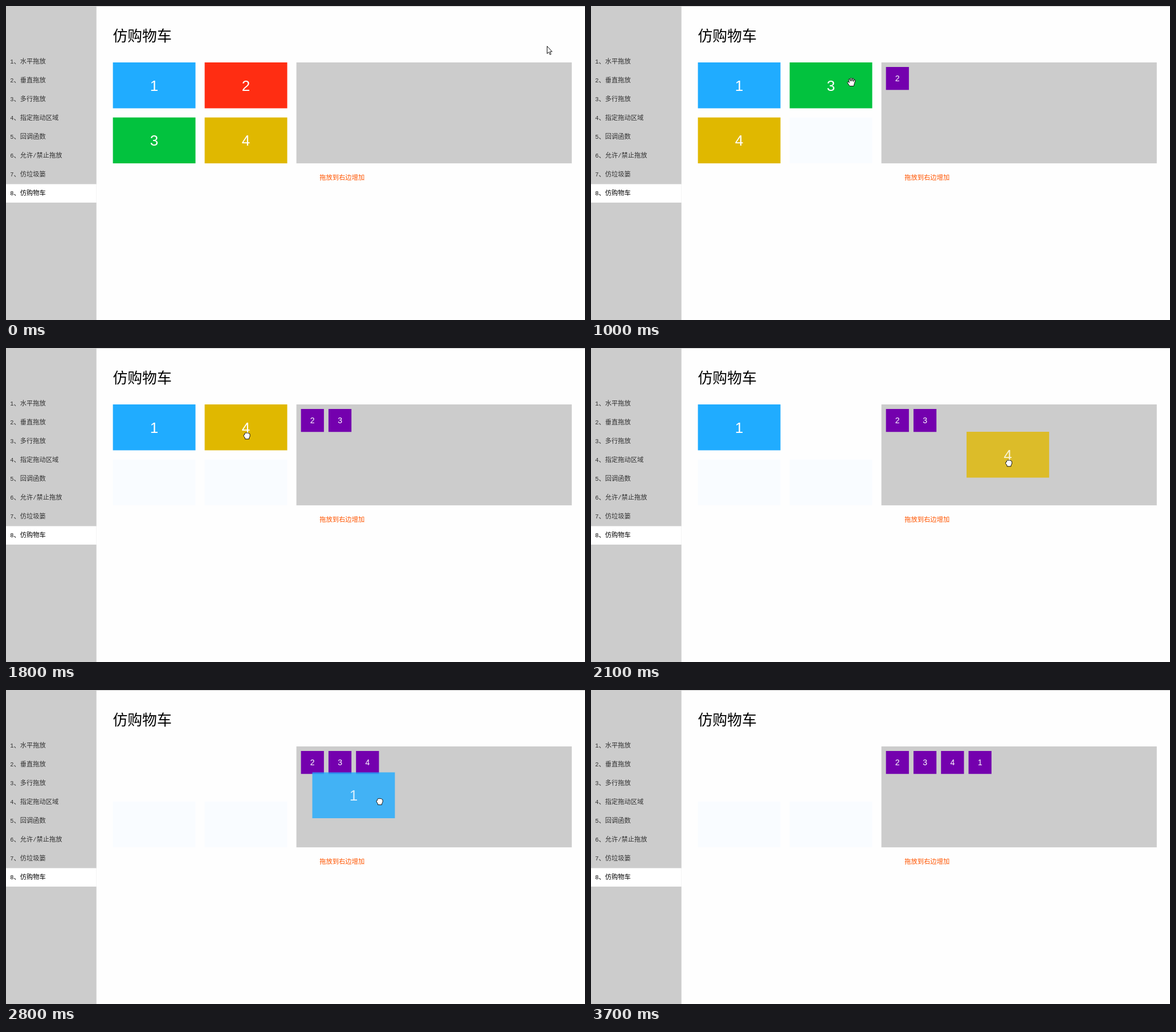
Animation of 1016 by 551 pixels, one loop 4.1 s. Source, as an HTML page with a canvas:

```html
<!DOCTYPE html>
<html lang="zh-CN">
<head>
<meta charset="utf-8">
<title>仿购物车</title>
<style>
  html, body { margin: 0; width: 100%; height: 100%; overflow: hidden; background: #fefefe; }
  canvas { display: block; }
</style>
</head>
<body>
<canvas id="stage" width="1016" height="551"></canvas>
<script>
const ctx = document.getElementById('stage').getContext('2d');
const LOOP = 4100, STEP = 100;
const CJK = '"Noto Sans CJK SC", "Noto Sans CJK", sans-serif';
const ARIAL = '"Liberation Sans", Arial, sans-serif';
const MONO = '"Liberation Mono", monospace';

const TILE = { w: 144.9, h: 80.5 };
const COLORS = { 1: '#20acff', 2: '#ff2d12', 3: '#02c23e', 4: '#e0b800' };
const MENU = ['水平拖放', '垂直拖放', '多行拖放', '指定拖动区域', '回调函数',
  '允许/禁止拖放', '仿垃圾篓', '仿购物车'];

// Pointer path: step, shape, x, y
const PATH = [
  [0, 'arrow', 949, 70], [3, 'open', 451, 150], [4, 'fist', 480, 154],
  [6, 'fist', 666.5, 165], [7, 'fist', 655, 182], [8, 'arrow', 645, 178],
  [10, 'open', 457, 133], [11, 'open', 457, 133], [12, 'fist', 545, 165],
  [13, 'fist', 645, 184], [14, 'fist', 655, 184], [15, 'arrow', 648, 182],
  [17, 'open', 422.5, 154], [18, 'fist', 422.5, 154], [19, 'fist', 459, 168],
  [21, 'fist', 733, 202], [22, 'arrow', 725, 200], [23, 'arrow', 465, 193],
  [24, 'arrow', 425, 193], [25, 'open', 305.5, 150], [26, 'fist', 340, 158],
  [27, 'fist', 563, 203], [29, 'fist', 748, 188], [30, 'fist', 775, 187],
  [31, 'arrow', 753, 185], [32, 'arrow', 753, 290], [33, 'arrow', 840, 230],
  [35, 'arrow', 993, 124], [36, 'arrow', 993, 126], [37, 'none', 993, 126]
];

const DRAGS = [
  { id: 2, start: 4, drop: 8, dx: 103, dy: 51 },
  { id: 3, start: 12, drop: 15, dx: 117, dy: 34 },
  { id: 4, start: 19, drop: 22, dx: 74, dy: 55 },
  { id: 1, start: 26, drop: 31, dx: 118, dy: 51 }
];

const SHAPES = {
  arrow: new Path2D('M.5 .5 V13.6 L3.5 10.8 L5.5 15.4 L7.4 14.6 L5.5 10.1 H9.3 Z'),
  fist: new Path2D('M-5.5 .5 Q-6 -2 -3.7 -2 V-4 Q-2.5 -6 -1 -4.6 Q.5 -6.2 1.8 -4.6 ' +
    'Q3.4 -5.6 4 -3.8 Q5.8 -4 5.6 -1.8 V1 L4 4 V5.8 H-3 V4 Z'),
  open: new Path2D('M-3 7.5 L-7 1.8 Q-7.6 -.6 -5.4 0 L-3.8 1.6 L-5 -4 Q-4.6 -6 -3 -4.6 ' +
    'L-1.6 -1 L-1.8 -6 Q-.6 -7.8 .4 -6 L.8 -1 L2 -5.8 Q3.6 -7 4 -5 L3.4 -.4 L5 -3.6 ' +
    'Q7 -4 6.8 -2 L5 3.6 L4 7.5 Z')
};

function rect(x, y, w, h, color) {
  ctx.fillStyle = color;
  ctx.fillRect(x, y, w, h);
}

function text(str, x, baseline, font, color, align = 'left') {
  ctx.font = font;
  ctx.fillStyle = color;
  ctx.textAlign = align;
  ctx.fillText(str, x, baseline);
}

function box(id, x, y, w, h, color, size) {
  rect(x, y, w, h, color);
  text(id, x + w / 2, y + h / 2 + size * 0.36, `${size}px ${ARIAL}`, '#fff', 'center');
}

const tile = (id, x, y) => box(id, x, y, TILE.w, TILE.h, COLORS[id], 26);

// Latin characters use the monospace face, the rest the CJK face
function menuLine(str, x, y, color) {
  for (const run of str.match(/[\x20-\x7e]+|[^\x20-\x7e]+/g)) {
    const font = run.charCodeAt(0) < 127 ? `10.4px ${MONO}` : `11.27px ${CJK}`;
    text(run, x, y, font, color);
    x += ctx.measureText(run).width;
  }
}

function pointerAt(step) {
  let i = PATH.length - 1;
  while (PATH[i][0] > step) i--;
  const [t0, shape, x0, y0] = PATH[i];
  const [t1, , x1, y1] = PATH[i + 1] || [t0 + 1, shape, x0, y0];
  const k = (step - t0) / (t1 - t0);
  return { shape, x: x0 + (x1 - x0) * k, y: y0 + (y1 - y0) * k };
}

function drawPage() {
  rect(0, 0, 1016, 551, '#fefefe');
  rect(0, 0, 1016, 1, '#ccc');
  rect(0, 0, 158.7, 551, '#ccc');
  rect(0, 312.6, 158.7, 32.4, '#fff');
  MENU.forEach((label, i) => {
    menuLine(`${i + 1}、${label}`, 7.2, 101.2 + i * 33, i === 7 ? '#000' : '#333');
  });
  text('仿购物车', 187.5, 61.5, `300 25.8px ${CJK}`, '#000');
  rect(509.6, 99, 483.2, 177.1, '#ccc');
  text('拖放到右边增加', 550.3, 304.8, `11.27px ${CJK}`, '#ff5500');
}

function drawSlots(step) {
  const taken = DRAGS.filter(d => step >= d.start).map(d => d.id);
  const left = [1, 2, 3, 4].filter(id => !taken.includes(id));
  for (let i = 0; i < 4; i++) {
    const x = 187.6 + (i % 2) * 161, y = 99 + (i >> 1) * 96.6;
    if (left[i]) tile(left[i], x, y);
    else if (i > 1) rect(x, y, TILE.w, TILE.h, '#f9fcff');
  }
}

function drawCart(step) {
  DRAGS.forEach((d, i) => {
    if (step >= d.drop) box(d.id, 517.6 + i * 48.3, 107, 40.25, 40.25, '#7400ae', 14);
  });
}

function drawDragged(step) {
  const d = DRAGS.find(d => step >= d.start && step <= d.drop);
  if (!d) return;
  const p = pointerAt(Math.min(step, d.drop - 1));
  ctx.globalAlpha = 0.8;
  tile(d.id, p.x - d.dx, p.y - d.dy);
  ctx.globalAlpha = 1;
}

function drawPointer(step) {
  const { shape, x, y } = pointerAt(step);
  if (shape === 'none') return;
  ctx.save();
  ctx.translate(x, y);
  ctx.fillStyle = '#fff';
  ctx.strokeStyle = '#111';
  ctx.lineWidth = 1;
  ctx.lineJoin = 'round';
  ctx.fill(SHAPES[shape]);
  ctx.stroke(SHAPES[shape]);
  ctx.restore();
}

const began = performance.now();
function frame() {
  const step = Math.floor(((performance.now() - began) % LOOP) / STEP);
  drawPage();
  drawSlots(step);
  drawCart(step);
  drawDragged(step);
  drawPointer(step);
  requestAnimationFrame(frame);
}
frame();
</script>
</body>
</html>
```
